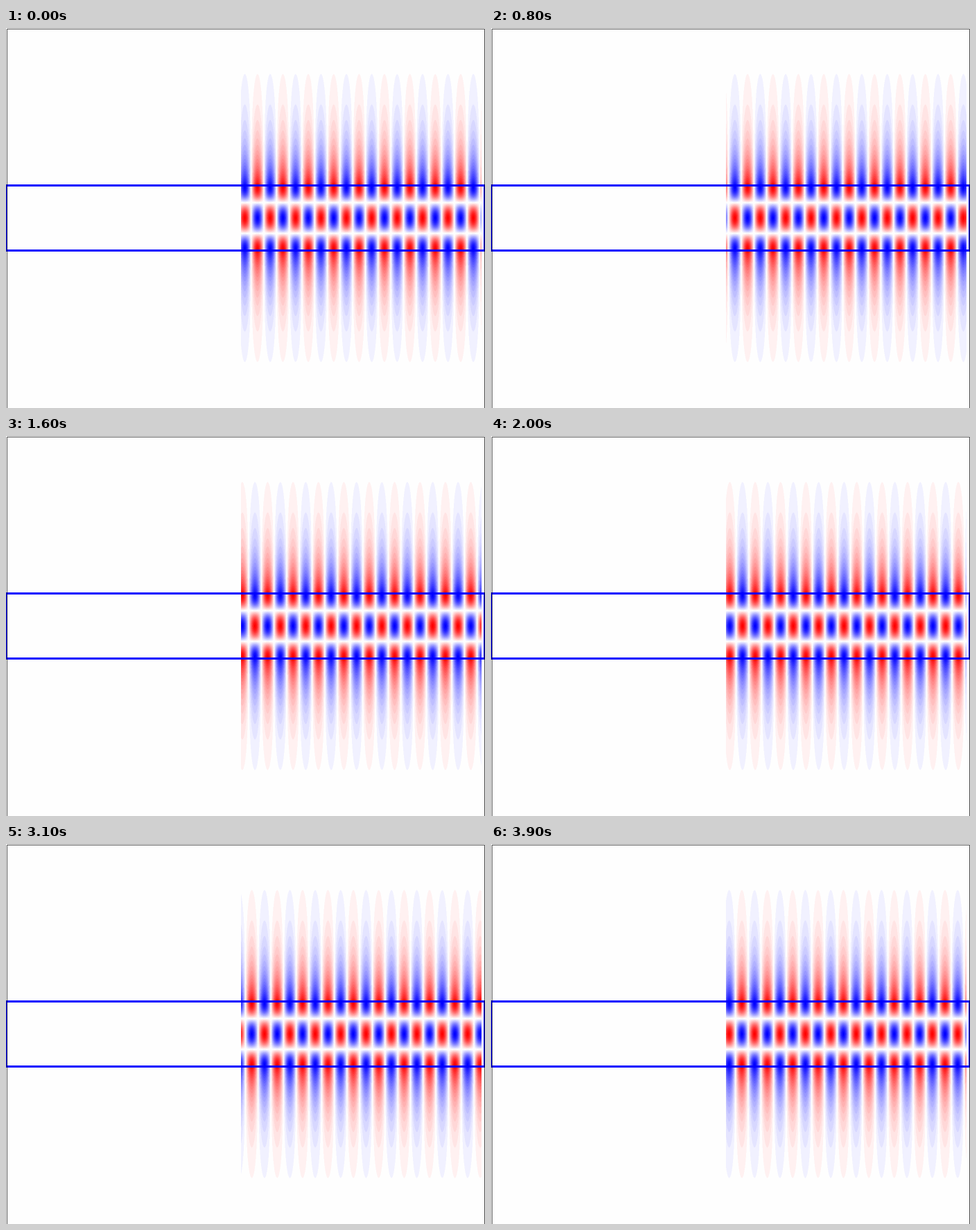
Animation of 691 by 549 pixels, one loop 4 s. Source, as a matplotlib script:

```python
import numpy as np
import matplotlib.pyplot as plt
from matplotlib.animation import FuncAnimation
from matplotlib.patches import Rectangle

W, H, DPI = 691, 549, 64
FRAMES, INTERVAL = 40, 100

LEFT, RIGHT = 339, 686          # horizontal extent of the field
TOP, BOTTOM = 227.5, 321.5      # slab walls
MID, HALF = (TOP + BOTTOM) / 2, (BOTTOM - TOP) / 2
WAVELENGTH, CREST = 36.63, 344.5
EDGE_PHASE, DECAY = 3.32, 0.0212
STEP, BIAS = 0.05, 0.35         # contour spacing and rounding offset
SS = 2                          # supersampling per axis
PAPER = 254 / 255


def px(n):
    """Pixels to points."""
    return n * 72 / DPI


def mode_profile(y):
    """Cosine inside the slab, exponential tails outside."""
    d = np.abs(y - MID)
    inside = np.cos(EDGE_PHASE * d / HALF)
    tail = np.cos(EDGE_PHASE) * np.exp(-DECAY * (d - HALF))
    return np.where(d <= HALF, inside, tail)


xs = LEFT + (np.arange((RIGHT - LEFT) * SS) + 0.5) / SS
ys = (np.arange(H * SS) + 0.5) / SS
profile = mode_profile(ys)


def field_image(i):
    shift = WAVELENGTH * i / FRAMES
    wave = np.cos(2 * np.pi * (xs - CREST - shift) / WAVELENGTH)
    v = np.outer(profile, wave)
    level = np.minimum(STEP * np.floor(np.abs(v) / STEP + BIAS), 1)
    fade = PAPER * (1 - level)
    rgb = np.stack([np.where((v > 0) & (level > 0), 1, fade),
                    fade,
                    np.where((v < 0) & (level > 0), 1, fade)], axis=-1)
    return rgb.reshape(H, SS, RIGHT - LEFT, SS, 3).mean(axis=(1, 3))


fig = plt.figure(figsize=(W / DPI, H / DPI), dpi=DPI, facecolor=(PAPER,) * 3)
ax = fig.add_axes([0, 0, 1, 1])
ax.axis("off")

field = ax.imshow(field_image(0), extent=(LEFT, RIGHT, H, 0),
                  interpolation="nearest", aspect="auto", zorder=1)
ax.set_xlim(0, W)
ax.set_ylim(H, 0)


def bar(x, y, w, h, color, alpha=1, z=2):
    ax.add_patch(Rectangle((x, y), w, h, fc=color, ec="none", lw=0,
                           alpha=alpha, zorder=z, antialiased=False))


# Slab outline
for y in (TOP, BOTTOM):
    bar(0, y - 1.5, W, 3, "blue")
for x in (0, W - 2):
    bar(x, TOP, 2, BOTTOM - TOP, "blue")

# Thin frame around the stage
ax.add_patch(Rectangle((0.5, 0.5), W - 1, H - 1, fill=False, ec="black",
                       lw=px(1), alpha=0.7, zorder=3, joinstyle="miter"))


def update(i):
    field.set_data(field_image(i))
    return (field,)


anim = FuncAnimation(fig, update, frames=FRAMES, interval=INTERVAL,
                     repeat=True, repeat_delay=0, blit=False)
plt.show()
```
